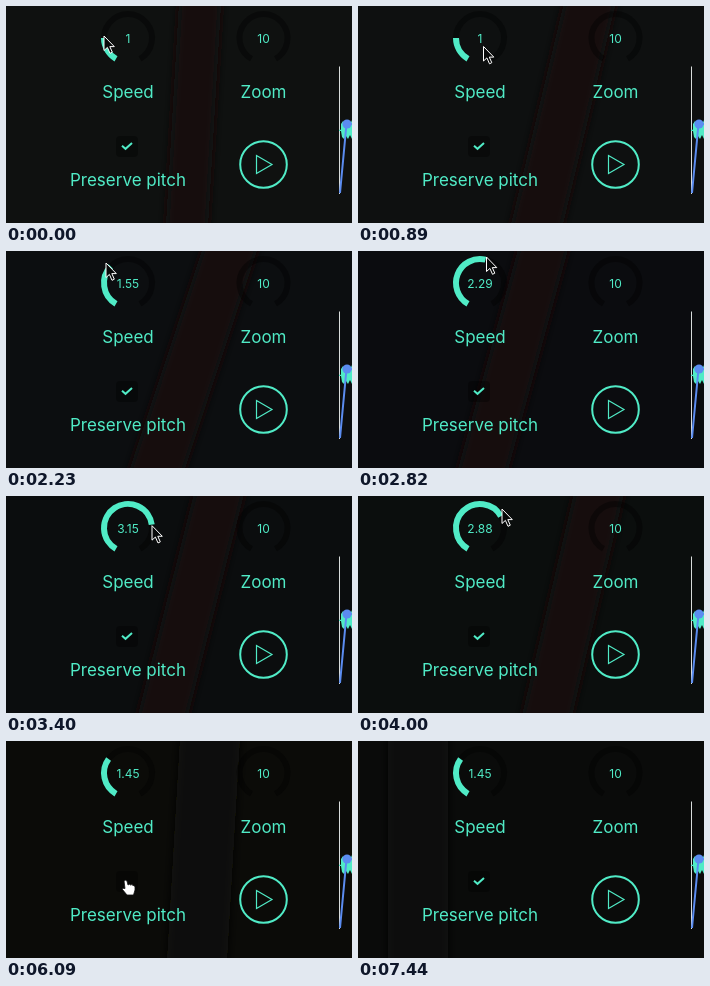
Recreate the animation shown at these times as an HTML page. Size 346x217 px, loop 8050 ms.

```html
<!DOCTYPE html>
<html lang="en">
<head>
<meta charset="utf-8">
<title>Player controls</title>
<style>
  html, body { margin: 0; width: 100%; height: 100%; overflow: hidden; background: #0d0e0e; }
  svg { display: block; width: 100vw; height: 100vh; }
  text { font-family: Inter, Roboto, sans-serif; font-size: 17px; fill: #50ebc6; text-anchor: middle; }
  .num { font-size: 12px; }
  .track { stroke: #000; stroke-opacity: .4; }
  .line, .track { fill: none; stroke-width: 6; }
  .line { stroke: #50ebc6; }
</style>
</head>
<body>
<svg viewBox="0 0 346 217">
  <defs>
    <filter id="soft" x="-50%" width="200%"><feGaussianBlur stdDeviation="5"/></filter>
  </defs>
  <rect id="base" width="346" height="217"/>
  <path id="band" filter="url(#soft)"/>

  <path class="track" id="speedTrack"/>
  <path class="line" id="speedArc"/>
  <path class="track" id="zoomTrack"/>
  <text class="num" id="speedText" x="122" y="36.5"></text>
  <text class="num" x="257.5" y="36.5">10</text>
  <text x="122" y="91.7">Speed</text>
  <text x="257.5" y="91.7">Zoom</text>

  <rect x="110" y="130" width="22" height="21" rx="4" opacity=".35"/>
  <path class="line" id="check" d="M116 139.8L119.5 142.8L126 137" style="stroke-width:2"/>
  <text x="122" y="179.5">Preserve pitch</text>

  <circle class="line" cx="257.5" cy="158.5" r="23.3" style="stroke-width:2"/>
  <path class="line" d="M250.5 149.5V167.5L266 158.5Z" style="stroke-width:1.2"/>

  <path d="M333.5 60.5V188" stroke="#d8dcdb"/>
  <path d="M333 123.7H335V118L337 115L339 118L342 115L344 119L346 114V133L344 129L342 133L340 130L338 133L336 131L335 125H333Z" fill="#50ebc6"/>
  <path d="M334 187L340.5 118H346" fill="none" stroke="#5b8cf0" stroke-width="2"/>
  <circle cx="341" cy="118" r="4.6" fill="#5b8cf0"/>

  <g id="pointer" stroke="#fff" stroke-linejoin="round">
    <path id="arrow" d="M0 0V14.5L3.4 11.4L6 17.3L8.3 16.2L5.8 10.6H10.3Z" fill="#080909"/>
    <path id="hand" stroke="#111" stroke-width=".8" fill="#fff"
      d="M-1.5 1Q0-.7 1.5 1L2.5 5Q4 3.5 5 5Q6.5 4 7.5 5.5Q9 5 9.5 7V10L8 15H1.5L-3 9.5Q-3 7.5-.5 8.5Z"/>
  </g>
</svg>
<script>
const LOOP = 8050, TICK = 148.1;
const $ = id => document.getElementById(id);

// Each key: tick, then the values reached at that tick.
const pointerPath = [
  [0, 98, 30], [3, 98, 33], [4, 98, 33], [5, 110, 38], [7, 141, 43], [8, 138, 42], [10, 100, 32],
  [11, 92, 28], [12, 91, 27], [13, 91, 26], [15, 100, 12], [17, 113, 4], [19, 128.5, 6], [20, 132, 7],
  [21, 136, 9], [24, 151, 40], [25, 150, 36], [27, 144, 13], [28, 142, 11], [29, 130, 6],
  [30, 108, 6], [31, 93, 24], [32, 101, 16.5], [34, 101, 16.5], [35, 103, 25], [38, 112, 85],
  [41, 119.5, 139], [46, 119.5, 139], [47, 150, 152], [48, 200, 172], [49, 268, 199]
];
const speedKeys = [
  [0, 1], [13, 1], [15, 1.55], [17, 1.95], [19, 2.29], [20, 2.4], [24, 3.4], [25, 3.3],
  [27, 2.88], [28, 2.7], [29, 2.35], [30, 1.85], [31, 1.2], [32, 1.45]
];
// Backdrop: base red, green, blue, then band top x, bottom x, width, red, green, blue.
const backdrop = [
  [0, 15, 17, 16, 195, 180, 42, 18, 15, 17],
  [11, 13, 15, 16, 270, 170, 60, 18, 17, 12],
  [19, 11, 12, 15, 190, 120, 50, 19, 16, 14],
  [27, 11, 14, 13, 245, 185, 50, 19, 16, 14],
  [32, 11, 13, 11, 50, 50, 80, 15, 15, 12],
  [41, 11, 11, 8, 205, 190, 60, 15, 15, 11],
  [50, 10, 11, 10, 60, 60, 60, 13, 13, 11]
];

function at(keys, tick) {
  const next = keys.findIndex(k => k[0] > tick);
  if (next < 0) return keys[keys.length - 1].slice(1);
  const a = keys[next - 1], b = keys[next];
  const p = (tick - a[0]) / (b[0] - a[0]);
  return a.slice(1).map((v, i) => v + (b[i + 1] - v) * p);
}

function arc(cx, sweep) {
  const point = deg => {
    const r = deg * Math.PI / 180;
    return `${cx + 24 * Math.sin(r)} ${32 - 24 * Math.cos(r)}`;
  };
  return `M${point(210)}A24 24 0 ${sweep > 180 ? 1 : 0} 1 ${point(210 + sweep)}`;
}

const show = (id, on) => $(id).setAttribute('visibility', on ? 'visible' : 'hidden');
const rgb = c => `rgb(${c.map(Math.round)})`;

function draw(tick) {
  const [x, y] = at(pointerPath, tick);
  const [speed] = at(speedKeys, tick);
  const [r, g, b, top, bottom, width, ...tint] = at(backdrop, tick);

  $('base').setAttribute('fill', rgb([r, g, b]));
  $('band').setAttribute('fill', rgb(tint));
  $('band').setAttribute('d', `M${top - width / 2}-20h${width}L${bottom + width / 2} 237h${-width}Z`);

  $('speedArc').setAttribute('d', arc(122, (speed - 0.25) * 80));
  $('speedText').textContent = +speed.toFixed(2);
  show('check', tick < 41 || tick >= 45);

  const overBox = tick >= 40 && tick < 47;
  $('pointer').setAttribute('transform', `translate(${x} ${y})`);
  show('arrow', !overBox && tick < 50);
  show('hand', overBox);
}

$('speedTrack').setAttribute('d', arc(122, 300));
$('zoomTrack').setAttribute('d', arc(257.5, 300));

const start = performance.now();
function frame() {
  const time = (performance.now() - start) % LOOP;
  draw(Math.floor(time / TICK + 0.06));
  requestAnimationFrame(frame);
}
frame();
</script>
</body>
</html>
```
